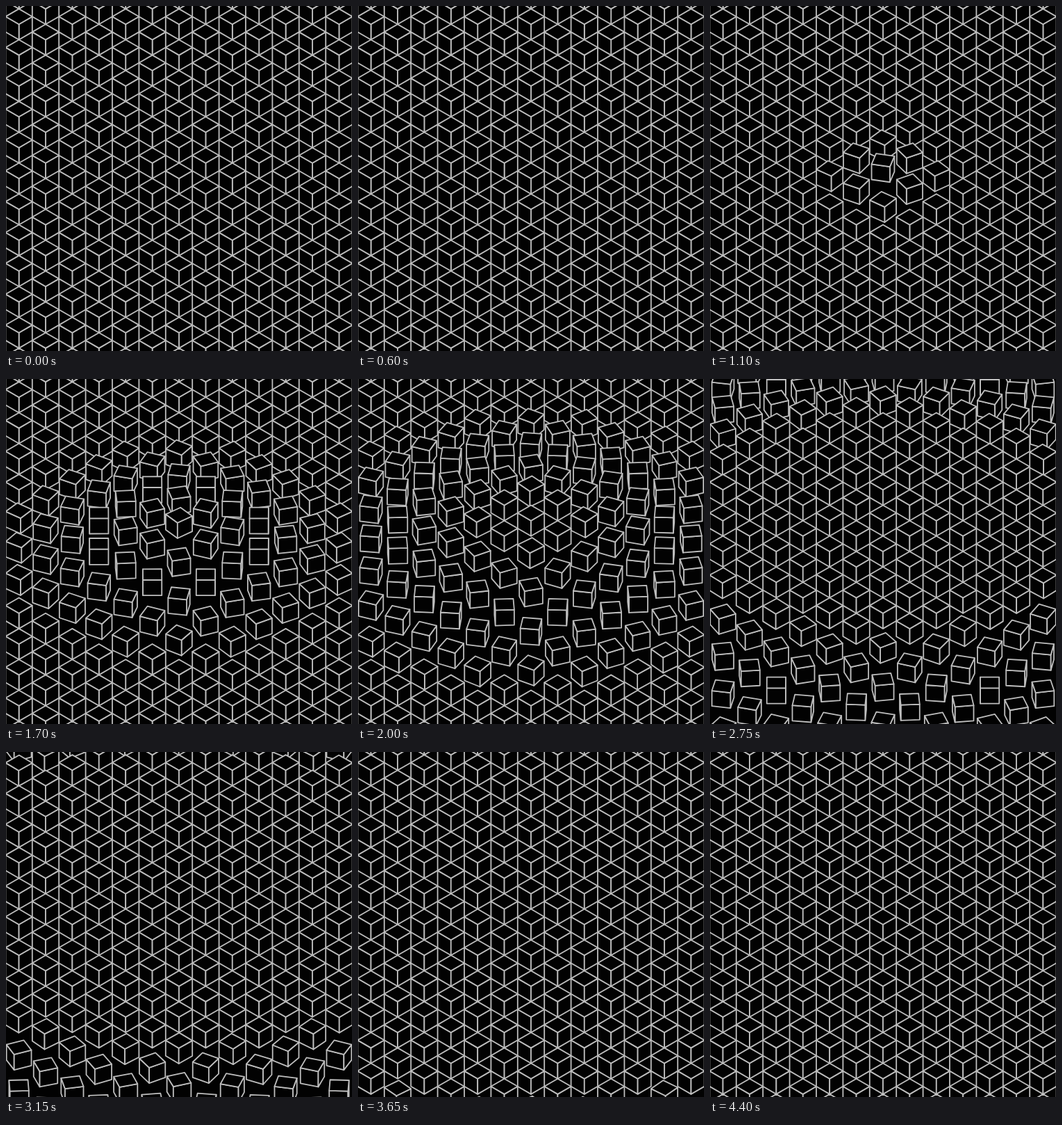
These frames come from a looping animation (498x496 px, 4450 ms). An HTML page with a canvas:

```html
<!DOCTYPE html>
<html lang="en">
<head>
<meta charset="utf-8">
<title>Cube ripple</title>
<style>
  html, body { margin: 0; width: 100%; height: 100%; overflow: hidden; background: #020202; }
  canvas { display: block; }
</style>
</head>
<body>
<canvas id="stage" width="498" height="496"></canvas>
<script>
const ctx = document.getElementById('stage').getContext('2d');
const LOOP = 4450;
const COL = 38.4;                 // column spacing, also the width of a cube
const EDGE = COL / Math.sqrt(3);  // projected edge length
const ROW = 2 * EDGE;
const TILT = 1 / Math.sqrt(3);    // foreshortening of the ground plane
const START = 745, SPEED = 0.277, TURN = 1030;
const CX = 249, CY = 248;

const cubes = [];
for (let row = -7; row <= 7; row++) {
  for (let col = -7; col <= 7; col++) {
    const x = col * COL;
    const y = (row + (col % 2 ? 0.5 : 0)) * ROW;
    cubes.push({ x, y, spin: col > 0 ? -1 : 1, delay: START + Math.hypot(x, y / TILT) / SPEED });
  }
}
cubes.sort((a, b) => a.y - b.y);

function face(points) {
  ctx.beginPath();
  for (const [x, y] of points) ctx.lineTo(x, y);
  ctx.closePath();
  ctx.fill();
  ctx.stroke();
}

function drawCube(x, y, angle) {
  const top = [], base = [];
  for (let i = 0; i < 4; i++) {
    const a = angle + i * Math.PI / 2;
    const px = x + COL / 2 * Math.sin(a);
    const py = y + COL / 2 * TILT * Math.cos(a);
    top.push([px, py - EDGE / 2]);
    base.push([px, py + EDGE / 2]);
  }
  for (let i = 0; i < 4; i++) {
    const j = (i + 1) % 4;
    const facing = Math.cos(angle + (i + 0.5) * Math.PI / 2);
    if (facing > 1e-6) face([top[i], top[j], base[j], base[i]]);
  }
  face(top);
}

function draw(now) {
  const t = now % LOOP;
  ctx.fillStyle = '#020202';
  ctx.fillRect(0, 0, 498, 496);
  ctx.strokeStyle = '#bebebe';
  ctx.lineWidth = 1.8;
  ctx.lineJoin = 'round';
  for (const c of cubes) {
    const p = Math.min(1, Math.max(0, (t - c.delay) / TURN));
    drawCube(CX + c.x, CY + c.y - p * ROW, c.spin * p * Math.PI / 2);
  }
}

const began = performance.now();
function tick() {
  draw(performance.now() - began);
  requestAnimationFrame(tick);
}
tick();
</script>
</body>
</html>
```
